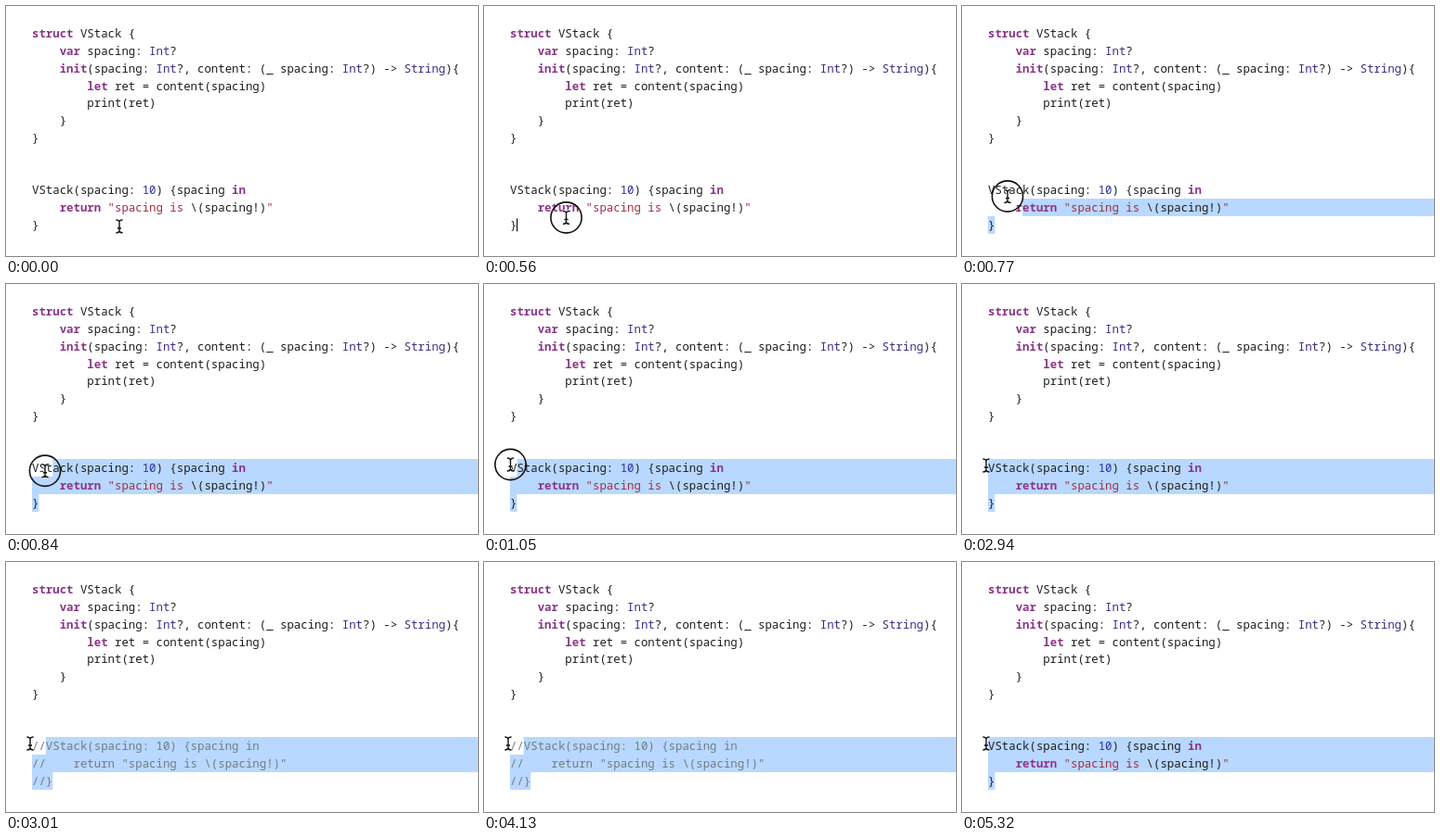
These frames come from a looping animation (508x270 px, 6.3 s). An HTML page:

```html
<!DOCTYPE html>
<html lang="en">
<head>
<meta charset="utf-8">
<title>Commenting out code</title>
<style>
html, body { margin: 0; width: 100%; height: 100%; overflow: hidden; background: #fff; }
svg { display: block; width: 100%; height: 100%; }
text { font: 12.37px "Noto Sans Mono", "DejaVu Sans Mono", monospace; fill: #1c1c1c; white-space: pre; font-variant-ligatures: none; }
.keyword { fill: #8b3489; font-weight: 600; }
.type { fill: #3f2b83; }
.number { fill: #2b2ba8; }
.string { fill: #a12c44; }
.comment { fill: #737a82; }
</style>
</head>
<body>
<svg viewBox="0 0 508 270">
  <path id="selection" fill="#b9d8ff"/>
  <g id="definition"></g>
  <g id="call"></g>
  <g id="commented"></g>
  <rect id="caret" x="35" y="229.5" width="1.2" height="14" fill="#111"/>
  <g id="pointer" fill="none">
    <circle id="ring" stroke="#111" stroke-width="1.6"/>
    <path id="beam" d="M-3.6-7Q-.5-7 0-5Q.5-7 3.6-7M0-5V5M-3.6 7Q-.5 7 0 5Q.5 7 3.6 7M-2 2H2"/>
  </g>
</svg>
<script>
const LEFT = 28, TOP = 19.8, COLUMN = 7.42, ROW = 18.82, WIDTH = 508;
const LOOP = 6300, STEP = 70, CALL_ROW = 9;
const $ = id => document.getElementById(id);

const definition = `struct VStack {
    var spacing: Int?
    init(spacing: Int?, content: (_ spacing: Int?) -> String){
        let ret = content(spacing)
        print(ret)
    }
}`.split("\n");
const call = `VStack(spacing: 10) {spacing in
    return "spacing is \\(spacing!)"
}`.split("\n");

const rules = [
  ["comment", /^\/\/.*/],
  ["keyword", /\b(?:struct|var|init|let|in|return)\b/],
  ["type", /\b(?:Int|String)\b/],
  ["number", /\b\d+\b/],
  ["string", /"[^\\"]*|"/]
];
const tokens = new RegExp(rules.map(([name, rule]) => `(?<${name}>${rule.source})`).join("|"), "g");

function highlight(line) {
  return line.replace(tokens, (match, ...rest) => {
    const groups = rest.at(-1);
    const name = Object.keys(groups).find(key => groups[key] !== undefined);
    return `<tspan class="${name}">${match}</tspan>`;
  });
}

function write(id, lines, firstRow) {
  $(id).innerHTML = lines.map((line, i) =>
    `<text x="${LEFT}" y="${TOP + (firstRow + i) * ROW + 14.3}">${highlight(line.replace(">", "&gt;"))}</text>`
  ).join("");
}

write("definition", definition, 0);
write("call", call, CALL_ROW);
write("commented", call.map(line => "//" + line), CALL_ROW);

// Pointer drag: time, x, y
const drag = [
  [210, 122, 238], [350, 114, 237], [490, 97, 232], [560, 88.5, 228.5],
  [770, 49, 205.5], [910, 35, 198], [1050, 28.5, 195], [1190, 26, 196]
];

function pointerAt(t) {
  const next = drag.findIndex(point => point[0] > t);
  if (next === 0) return drag[0].slice(1);
  if (next < 0) return drag.at(-1).slice(1);
  const [t0, x0, y0] = drag[next - 1], [t1, x1, y1] = drag[next];
  const k = (t - t0) / (t1 - t0);
  return [x0 + (x1 - x0) * k, y0 + (y1 - y0) * k];
}

// Selected area from a text position to the end column of the last call row
function selectionPath(row, column, endColumn) {
  const last = CALL_ROW + 2;
  let path = "";
  for (let r = row; r <= last; r++) {
    const x = LEFT + (r === row ? column * COLUMN : 0);
    const right = r === last ? LEFT + endColumn * COLUMN : WIDTH;
    const y = Math.round(TOP + r * ROW), bottom = Math.round(TOP + (r + 1) * ROW);
    path += `M${x} ${y}H${right}V${bottom}H${x}Z`;
  }
  return path;
}

function selectionAt(t, commented) {
  if (commented) return selectionPath(CALL_ROW, 2, 3);
  const [x, y] = pointerAt(t - STEP);   // the selection trails the pointer
  const row = Math.floor((y - TOP) / ROW);
  if (t < 210 || row > CALL_ROW + 1) return "";
  return selectionPath(row, Math.max(0, Math.round((x - LEFT) / COLUMN)), 1);
}

const beam = $("beam"), halo = beam.cloneNode();
halo.removeAttribute("id");
beam.before(halo);
for (const [node, color, width] of [[halo, "#fff", 3], [beam, "#111", 1.4]]) {
  node.setAttribute("stroke", color);
  node.setAttribute("stroke-width", width);
}

function render(now) {
  const t = Math.floor((now % LOOP) / STEP) * STEP;
  const commented = t >= 3010 && t < 5320;
  const selected = selectionAt(t, commented);
  $("selection").setAttribute("d", selected);
  $("call").style.display = commented ? "none" : "";
  $("commented").style.display = commented ? "" : "none";
  $("caret").style.display = t >= 70 && !selected ? "" : "none";
  $("pointer").setAttribute("transform", `translate(${pointerAt(t)})`);

  const press = Math.min(1, Math.max(0, t / 140));
  const release = Math.min(1, Math.max(0, (t - 1190) / 280));
  $("ring").setAttribute("r", 16.6 + 5.5 * release);
  $("ring").setAttribute("opacity", press * (1 - release));
  requestAnimationFrame(render);
}
requestAnimationFrame(render);
</script>
</body>
</html>
```
